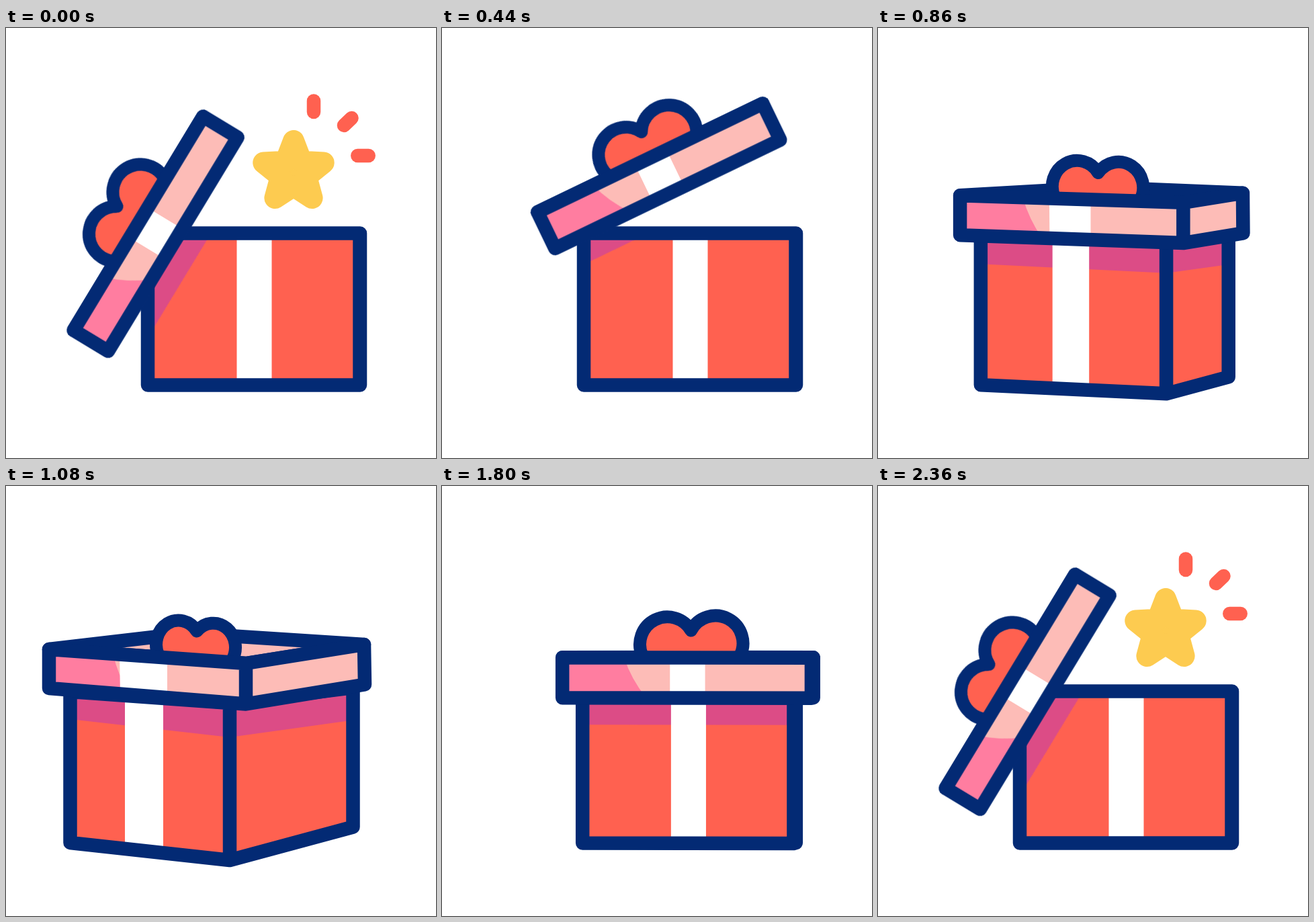
An HTML page for the animation above (2.4 s loop, 640x640 px).

```html
<!DOCTYPE html>
<html lang="en">
<head>
<meta charset="utf-8">
<title>Gift box</title>
<style>
  html, body { margin: 0; height: 100%; overflow: hidden; background: #fff; }
  svg { display: block; width: 100vw; height: 100vh; }

  .line { fill: none; stroke: #032a74; stroke-width: 20.5; stroke-linejoin: round; }
  .red { fill: #ff6150; }
  .pale { fill: #fdbcb7; }
  .pink { fill: #ff7da0; }
  .plum { fill: #dc4c86; }
  .white { fill: #fff; }

  .morph, .rise, .swing, .star, .ray {
    animation: 2400ms cubic-bezier(.333, 0, .667, 1) infinite;
  }

  /* Each shape has a front view and a three-quarter view. */
  .morph { d: var(--flat); animation-name: turn; }
  .body {
    --flat: path("M211 305.5 L526.5 305.5 L527 305.5 L527 531.5 L526.5 531.5 L211 531.5 Z M526.5 305.5 L526.5 531.5");
    --turned: path("M95.5 306 L333 323 L516.5 300 L516.5 507.5 L333 557 L95.5 531 Z M333 323 L333 557");
  }
  .band {
    --flat: path("M343.5 305 L395.5 305 L395.5 531 L343.5 531 Z");
    --turned: path("M177 313 L234 318 L234 546 L177 540 Z");
  }
  .shade {
    --flat: path("M211 300 L526.5 300 L527 300 L527 355.5 L526.5 355.5 L211 355.5 Z");
    --turned: path("M95.5 290 L333 310 L516.5 290 L516.5 348.6 L333 374 L95.5 347 Z");
  }
  .lid {
    --flat: path("M181 255.5 L553 255.5 L553 255.5 L553 315.5 L553 315.5 L181 315.5 Z M553 255.5 L553 315.5");
    --turned: path("M64 243 L357 264 L533 236 L534 295.5 L357 324.5 L64 301 Z M357 264 L357 324.5");
  }
  .top {
    --flat: path("M181 255.5 L553 255.5 L553 255.5 L400 255.5 Z");
    --turned: path("M64 243 L357 264 L533 236 L270 219 Z");
  }
  .gloss {
    --flat: path("M181 255.5 L273 255.5 Q283 287 306 315.5 L181 315.5 Z");
    --turned: path("M64 243 L159 249.5 Q167 282 184 311 L64 301 Z");
  }
  .strap {
    --flat: path("M342 255.5 L394 255.5 L394 315.5 L342 315.5 Z");
    --turned: path("M169 250.5 L240 255.5 L240 315 L170 309.5 Z");
  }
  .bow {
    --flat: path("M299 252 A41 41 0 0 1 372 215 A41 41 0 0 1 445 253");
    --turned: path("M227 252 A33 36 0 0 1 284 216 A33 36 0 0 1 336 260");
    stroke: #032a74;
    stroke-width: 19;
    stroke-linejoin: round;
  }

  @keyframes turn {
    0%, 26.667% { d: var(--flat); }
    45%, 60% { d: var(--turned); }
    76.25%, 100% { d: var(--flat); }
  }

  /* The lid pivots on its lower left corner while that corner lifts and slides. */
  .rise { animation-name: rise; }
  .swing { animation-name: slide, swing; transform-origin: 181px 315.5px; }
  @keyframes rise {
    0%, 8.333% { transform: translateY(165.5px); }
    20.417%, 75.833% { transform: translateY(0); }
    92.5%, 100% { transform: translateY(165.5px); }
  }
  @keyframes slide {
    0%, 8.333% { translate: -29px; }
    26.875%, 75.833% { translate: 0px; }
    92.5%, 100% { translate: -29px; }
  }
  @keyframes swing {
    0%, 8.333% { rotate: -58.8deg; }
    26.875%, 75.833% { rotate: 0deg; }
    91.042%, 100% { rotate: -58.8deg; }
  }

  .star {
    fill: #fdcb50; stroke: #fdcb50; stroke-width: 32; stroke-linejoin: round;
    animation-name: star;
  }
  @keyframes star {
    0%, 1.667% { transform: translateY(0); }
    13.333%, 85.833% { transform: translateY(162px); }
    97.5%, 100% { transform: translateY(0); }
  }
  .ray {
    stroke: #ff6150; stroke-width: 20.5; stroke-linecap: round;
    transform-box: fill-box; transform-origin: center;
    animation-name: ray;
  }
  @keyframes ray {
    0%, 1.667% { transform: scale(1); }
    7.5%, 92.5% { transform: scale(0); }
    98.333%, 100% { transform: scale(1); }
  }
</style>
</head>
<body>
<svg viewBox="0 0 640 640">
  <clipPath id="inside"><path class="morph body"/></clipPath>

  <path class="ray" d="M458 108.5V125"/>
  <path class="ray" d="M503 145L514.5 134"/>
  <path class="ray" d="M523.3 190H539.7"/>
  <polygon class="star" points="428,168 439.8,198.8 472.7,200.5 447,221.2 455.6,253 428,235 400.4,253 409,221.2 383.3,200.5 416.2,198.8"/>

  <path class="morph body red"/>
  <g clip-path="url(#inside)">
    <g class="rise"><g class="swing"><path class="morph shade plum"/></g></g>
  </g>
  <path class="morph band white"/>
  <path class="morph body line"/>

  <g class="rise"><g class="swing">
    <path class="morph top pale"/>
    <path class="morph top line"/>
    <path class="morph bow red"/>
    <path class="morph lid pale"/>
    <path class="morph gloss pink"/>
    <path class="morph strap white"/>
    <path class="morph lid line"/>
  </g></g>
</svg>
</body>
</html>
```
